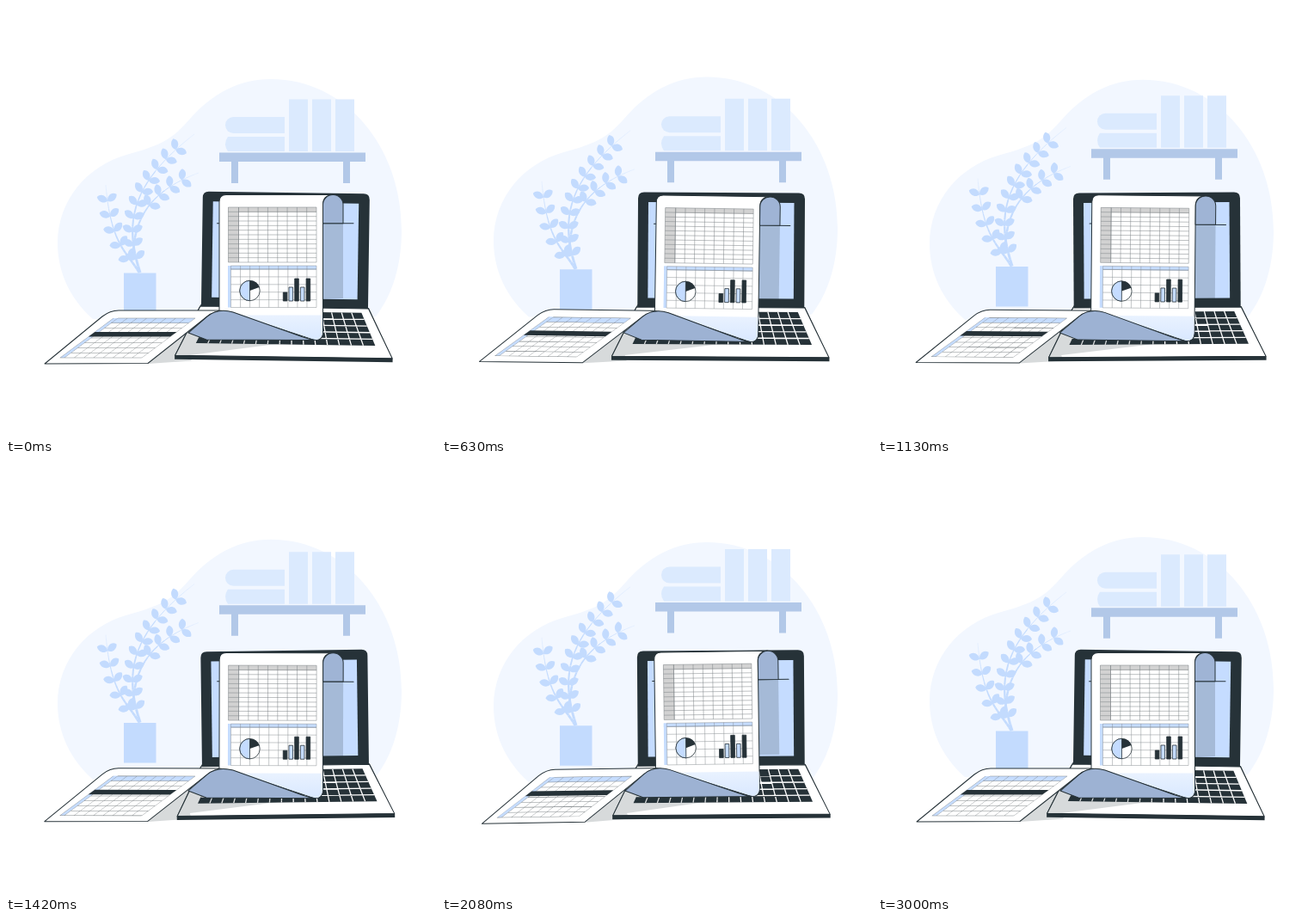
Write an HTML page that moves like this. It is 500 px wide and 500 px high and loops after 3040 ms.

```html
<!DOCTYPE html>
<html lang="en">
<head>
<meta charset="utf-8">
<title>Spreadsheet on a laptop</title>
<style>
  html, body { margin: 0; width: 100%; height: 100%; overflow: hidden; background: #fff; }
  svg { display: block; width: 100%; height: 100%; }
  .ink { stroke: #263238; stroke-linejoin: round; stroke-linecap: round; }
</style>
</head>
<body>
<svg viewBox="0 0 500 500">
  <defs>
    <linearGradient id="shade" x2="0" y2="1">
      <stop stop-color="#e9f2ff"/>
      <stop offset="1" stop-color="#d9e8ff"/>
    </linearGradient>
  </defs>
  <path id="blob" fill="#f2f7ff" d="M101 364C75 341 60 310 60 276C60 225 95 186 140 173C184 161 194 154 215 130C240 102 271 85 308 85C395 85 460 164 460 261C460 300 450 335 430 361L400 364Z"/>

  <g id="shelf" fill="#dbeafe">
    <path d="M329 108.500h22v60.500h-22zM356 108.500h22v60.500h-22zM383 108.500h22v60.500h-22z"/>
    <path d="M324 129H264.500a9.500 9.500 0 0 0 0 19H324z"/>
    <path d="M324 152H258Q252 160.500 258 169H324z"/>
    <path fill="#b2c8e8" d="M248 170.500h170v10.500h-18v25h-8v-25h-122v25h-8v-25h-14z"/>
  </g>

  <g id="plant">
    <path fill="#c3dbfe" d="M137 310.500h37.500v46.500h-37.500z"/>
  </g>

  <g id="laptop">
    <path class="ink" fill="#fff" d="M228 348L422 350L450 408H198L225 353Z"/>
    <path fill="#263238" d="M227.500 351V224q0-7 7-7H414.500q7 0 7 7V351z"/>
    <path fill="#c5dcff" d="M239.500 228.500H409V340H239.500z"/>
    <path class="ink" fill="#fff" d="M226.500 350.500H422L450.500 408H198Z"/>
    <path fill="#263238" d="M197.500 408H451V412.500H197.500z"/>
    <g id="keys"></g>
  </g>

  <g id="paper">
    <path fill="#263238" fill-opacity=".18" d="M165 416L215 376L330 391L214 406L216 412.500Z"/>
    <path fill="#263238" fill-opacity=".2" d="M368 253h24v87h-24z"/>
    <path class="ink" fill="none" d="M245.500 252.800H404"/>
    <path class="ink" fill="#fff" d="M45 416L112 361Q121 354 131 354H258Q244 353 234 361L165 415.500Z"/>
    <path class="ink" fill="#fff" d="M248 354V227.500q0-8 8-8H380Q368.500 220 368.500 231V379q0 9.500-9 9.500L262 356Z"/>
    <path fill="url(#shade)" d="M272 359.500H368V379q0 9-9 9z"/>
    <path class="ink" fill="#9fb4d5" d="M368.500 252.800V231a11.750 11.500 0 0 1 23.500 0V252.800z"/>
    <path class="ink" fill="#9db2d3" d="M212 380L234 361Q246 351 264 356L344 384.500Q354 388 360 388.500L233 388Z"/>
    <g id="content"></g>
  </g>
</svg>

<script>
const NS = 'http://www.w3.org/2000/svg';
const LOOP = 3.04;
const DARK = '#263238', BLUE = '#c5dcff', LEAF = '#c3dbfe';
const get = id => document.getElementById(id);

function add(parent, tag, attrs) {
  const node = document.createElementNS(NS, tag);
  for (const key in attrs) node.setAttribute(key, attrs[key]);
  return parent.appendChild(node);
}
const shape = (parent, d, fill, attrs = {}) => add(parent, 'path', { d, fill, ...attrs });
const rect = (parent, x, y, width, height, fill, attrs = {}) =>
  add(parent, 'rect', { x, y, width, height, fill, ...attrs });
const lines = (parent, d, stroke, width) =>
  shape(parent, d, 'none', { stroke, 'stroke-width': width });

// Evenly spaced rows and columns
function grid(x, y, w, h, cols, rows) {
  let d = '';
  for (let i = 0; i <= cols; i++) d += `M${x + w * i / cols} ${y}v${h}`;
  for (let i = 0; i <= rows; i++) d += `M${x} ${y + h * i / rows}h${w}`;
  return d;
}

// A tapered stem with pairs of leaves between two fractions of its length
function growStem(d, first, last, pairs) {
  const plant = get('plant');
  const stem = shape(plant, d, 'none');
  const length = stem.getTotalLength();
  const pointAt = s => stem.getPointAtLength(length * s);

  const steps = 24;
  for (let i = 0; i < steps; i++) {
    const a = pointAt(i / steps), b = pointAt((i + 1) / steps);
    lines(plant, `M${a.x} ${a.y}L${b.x} ${b.y}`, LEAF, 2.8 * (1 - i / steps) ** 1.2 + .2);
  }
  for (let i = 0; i < pairs; i++) {
    const s = first + (last - first) * i / (pairs - 1);
    const p = pointAt(s), q = pointAt(s + .01);
    const heading = Math.atan2(q.y - p.y, q.x - p.x) * 180 / Math.PI;
    for (const side of [-1, 1])
      shape(plant, 'M0 0C2 -5.500 9 -6.500 13 -2C11.500 4.500 4 5 0 0Z', LEAF, {
        transform: `translate(${p.x} ${p.y}) rotate(${heading + side * 52}) scale(1 ${-side})`
      });
  }
}

function drawKeys() {
  const g = get('keys');
  const [top, bottom, cols, rows] = [355.5, 393.5, 15, 5];
  const left = k => 240 - 18 * k, right = k => 414 + 16.5 * k;
  shape(g, `M240 ${top}H414L430.5 ${bottom}H222Z`, DARK);
  let d = '';
  for (let i = 1; i < cols; i++) {
    const x = k => left(k) + (right(k) - left(k)) * i / cols;
    d += `M${x(0)} ${top}L${x(1)} ${bottom}`;
  }
  for (let j = 1; j < rows; j++) d += `M${left(j / rows)} ${top + 7.6 * j}H${right(j / rows)}`;
  lines(g, d, '#fff', 1.3);
}

function drawContent() {
  const g = get('content');

  rect(g, 258.5, 234, 102.5, 6, '#d2d2d2');
  rect(g, 258.5, 234, 12, 64, '#d2d2d2');
  lines(g, grid(270.5, 234, 90.5, 64, 8, 12) + grid(258.5, 234, 12, 64, 1, 12), '#7b8184', .5);

  rect(g, 258, 302, 103, 4.5, BLUE);
  rect(g, 258, 302, 3.5, 48.5, BLUE);
  lines(g, grid(261.5, 306, 99.5, 44.5, 9, 5) + grid(261.5, 302, 99.5, 4, 9, 1), '#8b9194', .5);

  const outline = { stroke: DARK, 'stroke-width': .8 };
  add(g, 'circle', { cx: 283.5, cy: 331, r: 11.7, fill: '#fff', ...outline });
  shape(g, 'M283.500 319.300a11.700 11.700 0 0 0 0 23.400z', BLUE, outline);
  shape(g, 'M283.500 331V319.300A11.700 11.700 0 0 1 294.500 327z', DARK);

  [10, 16, 26, 16, 26].forEach((h, i) =>
    rect(g, 322.3 + 6.7 * i, 343 - h, 4.6, h, i % 2 ? BLUE : DARK, outline));

  // Loose sheet table in slanted unit space, 95 wide and 46 high
  const sheet = add(g, 'g', { transform: 'matrix(1 0 -1.348 1 125 363)' });
  rect(sheet, 0, 0, 95, 5.8, BLUE);
  rect(sheet, 0, 0, 5, 46, BLUE);
  lines(sheet, grid(5, 0, 90, 46, 8, 8) + 'M0 0V46H5', '#81878a', .55);
  rect(sheet, 0, 16, 95, 5.6, DARK);
}

// Linear swing with a 3 s period: 1 at the peak, -1 half a period later
function swing(t, peak) {
  const phase = (((t - peak) / 3) % 1 + 1) % 1;
  return Math.abs(phase - .5) * 4 - 1;
}
const move = (id, dy) => get(id).setAttribute('transform', `translate(0 ${dy})`);
const tilt = (id, angle, x, y) => get(id).setAttribute('transform', `rotate(${angle} ${x} ${y})`);

function render(t) {
  move('blob', 1.65 - 4.95 * swing(t, .5));
  move('shelf', t < .5 ? 0 : -5 * (1 - swing(t, .5)));
  move('plant', -5 * (1 - swing(t, 0)));
  tilt('laptop', swing(t, .13), 323.5, 313.5);
  tilt('paper', swing(t, .75), 219, 318);
}

growStem('M155 310C140 285 122 278 116 208', .18, .83, 5);
growStem('M156 310C136 250 147 205 219 149', .09, .85, 10);
growStem('M148 292C148 245 170 214 224 194', .48, .84, 4);
drawKeys();
drawContent();

function tick() {
  render(performance.now() / 1000 % LOOP);
  requestAnimationFrame(tick);
}
tick();
</script>
</body>
</html>
```
